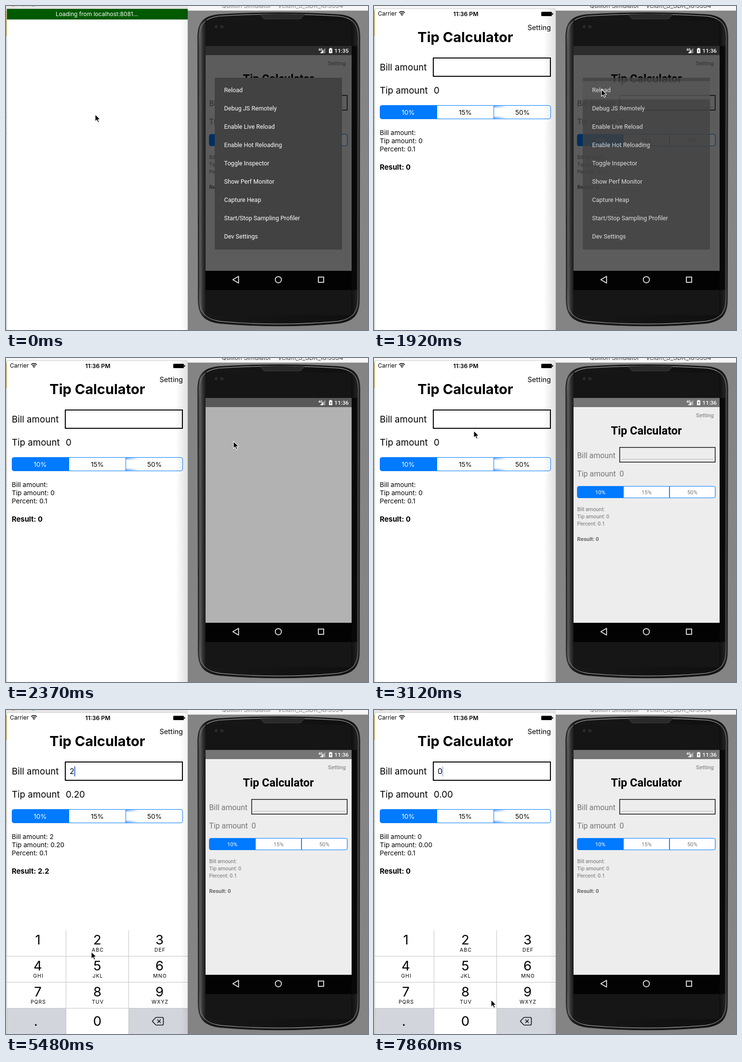
An HTML page for the animation above (8 s loop, 751 px wide and 673 px high).

```html
<!DOCTYPE html>
<html lang="en">
<head>
<meta charset="utf-8">
<title>Tip Calculator on two devices</title>
<style>
html, body { margin: 0; width: 100%; height: 100%; overflow: hidden; background: #fff; }
svg { display: block; width: 751px; height: 673px; }
text { white-space: pre; }
.ios { font-family: Inter, "Liberation Sans", sans-serif; }
.droid { font-family: Roboto, "Open Sans", sans-serif; }
</style>
</head>
<body>
<svg id="stage" viewBox="0 0 751 673" xmlns="http://www.w3.org/2000/svg"></svg>
<script>
const LOOP = 8000, STEPS = 54, LEAD = 16;
const BLUE = '#007aff', KEY_GREY = '#d2d5db';

// Markup helpers
const rect = (x, y, w, h, fill, more = '') =>
  `<rect x="${x}" y="${y}" width="${w}" height="${h}" fill="${fill}" ${more}/>`;
const text = (x, y, size, str, more = '') =>
  `<text x="${x}" y="${y}" font-size="${size}" ${more}>${str}</text>`;
const path = (d, more) => `<path d="${d}" ${more}/>`;
const line = (x1, y1, x2, y2, stroke, w = 1) =>
  path(`M${x1} ${y1}L${x2} ${y2}`, `stroke="${stroke}" stroke-width="${w}" fill="none"`);
const group = (id, body, more = '') => `<g id="${id}" ${more}>${body}</g>`;
const MID = 'text-anchor="middle"', END = 'text-anchor="end"', BOLD = 'font-weight="700"';

const defs = `<defs>
  <linearGradient id="shade"><stop offset="0" stop-opacity="0"/><stop offset="1"/></linearGradient>
  <linearGradient id="tint"><stop offset="0" stop-color="#7db8ff"/><stop offset="1" stop-color="#fff"/></linearGradient>
  <linearGradient id="rim"><stop offset="0" stop-color="#2a2a2a"/><stop offset=".015" stop-color="#5a5a5a"/>
    <stop offset=".03" stop-color="#333"/><stop offset=".05" stop-color="#171717"/>
    <stop offset=".95" stop-color="#101010"/><stop offset="1" stop-color="#2c2c2c"/></linearGradient>
  <linearGradient id="glint" x2="0" y2="1"><stop offset="0" stop-color="#8a8a8a"/><stop offset=".12" stop-color="#4e4e4e"/>
    <stop offset=".88" stop-color="#4e4e4e"/><stop offset="1" stop-color="#8a8a8a"/></linearGradient>
  <clipPath id="pane"><rect x="2" y="6" width="375" height="667"/></clipPath>
</defs>`;

// Left simulator window
function leftWindow() {
  const edge = rect(0, 0, 2, 673, '#f1f1f1') + rect(0, 10, 2, 52, '#d9b23c') +
    rect(0, 231, 2, 1, '#888') + rect(0, 265, 2, 1, '#888') + rect(1, 0, 1, 673, '#b4b4b4');
  const lights = [15, 36, 56].map(x => `<circle class="light" cx="${x}" cy="-5" r="6"/>`).join('');
  const bar = rect(0, 0, 377, 5.5, '#ececec', 'id="leftBar"') + lights +
    text(211, -1, 13, 'Velum 5s - vOS 9.1 (13B143)', `${MID} fill="#555"`) + rect(2, 5, 375, 1, '#cfcfcf');

  const arc = r => path(`M${58 - r * .75} ${20 - r * .75}A${r} ${r} 0 0 1 ${58 + r * .75} ${20 - r * .75}`,
    'fill="none" stroke="#000" stroke-width="1.7"');
  const status = text(8, 20, 12, 'Carrier') + arc(8) + arc(4.8) +
    path('M58 20.5L56 17.8Q58 16.4 60 17.8Z', '') +
    text(190.5, 20.5, 12.2, '11:36 PM', `${MID} font-weight="600"`) +
    rect(347, 12, 22, 9, '#000', 'rx="1.5"') + rect(369.5, 14.5, 2, 4, '#000', 'rx="1"');

  const label = (y, id) => text(12, y, 13.6, '', `id="${id}"`);
  const app = text(367, 50, 14.6, 'Setting', END) +
    text(189.5, 75, 29, 'Tip Calculator', `${MID} ${BOLD}`) +
    text(12, 134, 18.7, 'Bill amount') + rect(123, 108, 243, 38, '#fff', 'stroke="#000" stroke-width="2"') +
    text(132, 133, 15.8, '', 'id="bill"') + rect(142, 117, 2, 21, '#3f68d8', 'id="caret"') +
    text(12, 182, 18.7, 'Tip amount') + text(124, 182, 18.7, '', 'id="tip"') +
    rect(249, 207, 26, 4, 'url(#tint)') + rect(249, 230, 26, 4.5, 'url(#tint)') +
    path('M131 206.5H16.5Q12.5 206.5 12.5 210.5V230.5Q12.5 234.5 16.5 234.5H131Z', `fill="${BLUE}"`) +
    rect(12.5, 206.5, 354, 28, 'none', `rx="4" stroke="${BLUE}"`) + line(248.5, 206, 248.5, 235, BLUE) +
    text(71, 225.5, 13.6, '10%', `${MID} fill="#fff"`) + text(189.5, 225.5, 13.6, '15%', MID) +
    text(308, 225.5, 13.6, '50%', MID) +
    label(268, 'sumBill') + label(285, 'sumTip') + text(12, 302, 13.6, 'Percent: 0.1') +
    text(12, 340, 14.8, '', `id="sumResult" ${BOLD}`);

  const loading = rect(2, 6, 375, 22, '#005a00') +
    text(188.5, 21, 12, 'Loading from localhost:8081...', `${MID} fill="#fff"`);

  return rect(0, 0, 377, 673, '#fff') + group('status', status) + group('app', app) +
    `<g clip-path="url(#pane)">${group('pad', keypad())}</g>` +
    group('loading', loading) + edge + bar +
    rect(352, 6, 25, 667, 'url(#shade)', 'id="shadow"');
}

function keypad() {
  const letters = ['', 'ABC', 'DEF', 'GHI', 'JKL', 'MNO', 'PQRS', 'TUV', 'WXYZ'];
  const cols = [2, 125, 255, 377], mids = [66, 189.5, 318.5];
  let out = rect(2, 457, 375, 216, '#fff');
  letters.forEach((abc, i) => {
    const c = i % 3, y = 457 + 54 * Math.floor(i / 3);
    out += rect(cols[c], y, cols[c + 1] - cols[c], 54, '#fff', `id="key${i + 1}"`) +
      text(mids[c], y + 30, 27.5, i + 1, MID) +
      text(mids[c] + 1, y + 45, 10.5, abc, `${MID} letter-spacing="1"`);
  });
  out += rect(2, 619, 123, 54, KEY_GREY) + rect(125, 619, 130, 54, '#fff', 'id="key0"') +
    rect(255, 619, 122, 54, KEY_GREY) +
    text(62, 656, 27, '.', MID) + text(189.5, 656, 27.5, '0', MID) +
    path('M303.5 646.5L310.5 639Q311 638.5 312 638.5H324Q326.5 638.5 326.5 641V652Q326.5 654.5 324 654.5H312Q311 654.5 310.5 654Z' +
      'M314 643L321 650M321 643L314 650', 'fill="none" stroke="#111" stroke-width="1.6"');
  for (const y of [511.5, 565.5, 619.5]) out += line(2, y, 377, y, '#c4c4c4');
  for (const x of [124.5, 254.5]) out += line(x, 457, x, 673, '#c4c4c4');
  return out;
}

// Right emulator window
function rightWindow() {
  const body = 'M398 64C398 33 412 21 440 18Q566 10 692 18C721 21 734 33 734 64' +
    'L733 610C733 645 717 655 690 659Q566 670 442 659C415 655 399 645 399 610Z';
  const face = 'M401 66C401 36 416 24 442 21Q566 13 690 21C717 24 731 36 731 66' +
    'L730 608C730 641 714 651 688 655Q566 666 444 655C418 651 402 641 402 608Z';
  const phone = path(body, 'fill="url(#rim)" stroke="#1c1c1c" stroke-width="1.5"') +
    path(face, 'fill="none" stroke="url(#glint)" stroke-width="1.4"') +
    path('M528 18Q566 15 619 18L612 26Q611 27 609 27H537Q535 27 534 26Z', 'fill="#2a2a2a" stroke="#3c3c3c"') +
    rect(414, 30, 302, 53, '#151515') + rect(414, 590, 302, 52, '#161616') +
    '<circle cx="436" cy="43" r="3.6" fill="#282828"/><circle cx="448" cy="43" r="3.6" fill="#282828"/>' +
    rect(717, 83, 11, 507, '#090909');

  const small = (y, str, more = '') => text(421.5, y, 10.9, str, more);
  const app = text(705, 123, 11.8, 'Setting', END) +
    text(565, 159, 23.4, 'Tip Calculator', `${MID} ${BOLD} fill="#000"`) +
    text(421.5, 208, 15.8, 'Bill amount') + rect(509.7, 185.7, 198, 30.6, 'none', 'stroke="#111" stroke-width="1.5"') +
    line(514, 210.5, 704, 210.5, '#b0b0b0') +
    text(421.5, 246, 15.8, 'Tip amount') + text(509.5, 246, 15.8, '0') +
    rect(422, 266.5, 286, 24, '#fff', `rx="4" stroke="${BLUE}" stroke-width="1.2"`) +
    path('M518 266H426Q421.5 266 421.5 270V287Q421.5 291 426 291H518Z', `fill="${BLUE}"`) +
    line(613, 266, 613, 291, BLUE, 1.8) +
    text(469.5, 282.5, 11.3, '10%', `${MID} fill="#fff"`) + text(565.5, 282.5, 11.3, '15%', MID) +
    text(660.5, 282.5, 11.3, '50%', MID) +
    small(318, 'Bill amount:') + small(333, 'Tip amount: 0') + small(348, 'Percent: 0.1') +
    text(421.5, 380, 11.4, 'Result: 0', `${BOLD} fill="#666"`);

  const icons = text(648, 93, 7, '4G', `${BOLD} fill="#fff"`) +
    path('M662.5 87V98H651.5Z', 'fill="#fff" opacity=".4"') + path('M658 91.5V98H651.5Z', 'fill="#fff"') +
    path('M670 88.5H672V87H675V88.5H677V98H670Z', 'fill="#fff"') +
    path('M674 90L672 93.5H673.5L673 96.5L675.5 92.5H674Z', 'fill="#555"') +
    text(711, 97, 11.7, '', `id="clock" ${END} font-weight="500" fill="#fff"`);

  const items = ['Reload', 'Debug JS Remotely', 'Enable Live Reload', 'Enable Hot Reloading', 'Toggle Inspector',
    'Show Perf Monitor', 'Capture Heap', 'Start/Stop Sampling Profiler', 'Dev Settings'];
  const menu = rect(433, 149, 264, 357, '#424242', 'rx="2"') + rect(433, 156, 264, 38, '#555', 'id="ripple"') +
    items.map((s, i) => text(452.5, 179 + 38 * i, 12.6, s, 'fill="#fff"')).join('');

  const nav = rect(414, 550, 303, 40, '#030303') +
    '<g fill="none" stroke="#e8e8e8" stroke-width="1.8">' +
    '<path d="M470.5 568.5L482.5 561.5V575.5Z" stroke-linejoin="round"/><circle cx="565" cy="568.5" r="6.4"/>' +
    '<rect x="648" y="563" width="11" height="11"/></g>';

  return rect(377, 0, 374, 673, '#848484') + rect(377, 0, 374, 9.5, '#f6f6f6') + rect(377, 9, 374, 1, '#c8c8c8') +
    text(573.5, 4, 12.9, 'Quillon Simulator - Velum_3_SDK_18:5554', `id="title" class="ios" ${MID}`) +
    phone + rect(414, 83, 303, 467, '#ededed') + rect(414, 83, 303, 19, '#757575') +
    group('droidApp', app, 'fill="#757575"') + rect(414, 83, 303, 467, '#000', 'id="dim"') +
    icons + group('menu', menu) + nav;
}

const arrow = path('M0 0V14.8L3.4 11.6L5.7 16.8L8.2 15.7L5.9 10.7H10.4Z',
  'fill="#000" stroke="#fff" stroke-width="1.1" stroke-linejoin="round"');

document.getElementById('stage').innerHTML = defs +
  `<g class="ios">${leftWindow()}</g><g class="droid">${rightWindow()}</g>` + group('cursor', arrow);

const el = {};
document.querySelectorAll('[id]').forEach(n => el[n.id] = n);
const lights = [...document.querySelectorAll('.light')];

// Tracks hold [step, ...values]
const POINTER = [[2, 185, 225], [8, 478, 175], [10, 472, 173], [18, 472, 173], [21, 207, 151], [26, 203, 126],
  [29, 203, 126], [34, 177, 500], [37, 177, 502], [39, 184, 523], [45, 185, 526], [47, 343, 640],
  [49, 343, 642], [50, 205, 645], [52, 205, 645], [53, 243, 602]];
const DIM = [[13, .61], [14, .57], [15, .49], [16, .25], [17, 0]];
const MENU = [[12, 1], [13, .8], [14, .25], [15, 0]];
const SLIDE = [[28, 216], [32, 0]];
const BILL = [[0, ''], [36, '2'], [40, '25'], [48, '2'], [49, ''], [52, '0']];
const PRESS = { 35: '2', 40: '5', 51: '0' };

const smooth = p => p * p * (3 - 2 * p);
function along(track, k) {
  const i = track.findIndex(p => p[0] >= k);
  if (i === 0) return track[0].slice(1);
  if (i < 0) return track[track.length - 1].slice(1);
  const a = track[i - 1], b = track[i], p = smooth((k - a[0]) / (b[0] - a[0]));
  return a.slice(1).map((v, j) => v + (b[j + 1] - v) * p);
}
const latest = (track, k) => track.filter(p => p[0] <= k).pop()[1];
const show = (node, on) => node.setAttribute('visibility', on ? 'visible' : 'hidden');
const alpha = (node, v) => node.setAttribute('opacity', v);
const write = (node, s) => { if (node.textContent !== s) node.textContent = s; };

function draw(ms) {
  const k = Math.min(STEPS - 1, Math.floor((ms % LOOP + LEAD) * STEPS / LOOP));
  const rightFocus = k >= 9 && k < 26;

  show(el.loading, k < 3);
  show(el.status, k >= 3);
  show(el.app, k >= 1);
  el.leftBar.setAttribute('fill', rightFocus ? '#f6f6f6' : '#e6e6e6');
  lights.forEach((n, i) => n.setAttribute('fill', rightFocus ? '#dcdcdc' : ['#fc605c', '#fdbc40', '#34c749'][i]));
  el.title.setAttribute('fill', rightFocus ? '#444' : '#888');
  el.shadow.setAttribute('x', rightFocus ? 352 : 362);
  el.shadow.setAttribute('width', rightFocus ? 25 : 15);
  alpha(el.shadow, rightFocus ? .12 : .06);

  // Bill form
  const bill = latest(BILL, k), tip = k < 36 ? '0' : (bill * .1).toFixed(2);
  write(el.bill, bill);
  write(el.tip, tip);
  write(el.sumBill, 'Bill amount: ' + bill);
  write(el.sumTip, 'Tip amount: ' + tip);
  write(el.sumResult, 'Result: ' + +(bill * 1.1).toFixed(2));
  show(el.caret, k >= 29);
  el.caret.setAttribute('x', 132 + 9.6 * bill.length);
  alpha(el.caret, k < 42 ? 1 : k < 46 ? [.6, .2, 0, 0][k - 42] : k === 53 ? .45 : 1);

  // Keypad
  show(el.pad, k > 28);
  el.pad.setAttribute('transform', `translate(0 ${along(SLIDE, k)[0]})`);
  for (const d of '250') el['key' + d].setAttribute('fill', PRESS[k] === d ? KEY_GREY : '#fff');

  // Emulator
  write(el.clock, k < 5 ? '11:35' : '11:36');
  show(el.droidApp, k < 14 || k >= 17);
  alpha(el.dim, along(DIM, k)[0]);
  alpha(el.menu, along(MENU, k)[0]);
  alpha(el.ripple, k === 12 || k === 13 ? 1 : 0);

  const [x, y] = along(POINTER, k);
  el.cursor.setAttribute('transform', `translate(${x} ${y})`);
}

const start = performance.now();
function tick() {
  draw(performance.now() - start);
  requestAnimationFrame(tick);
}
tick();
</script>
</body>
</html>
```
